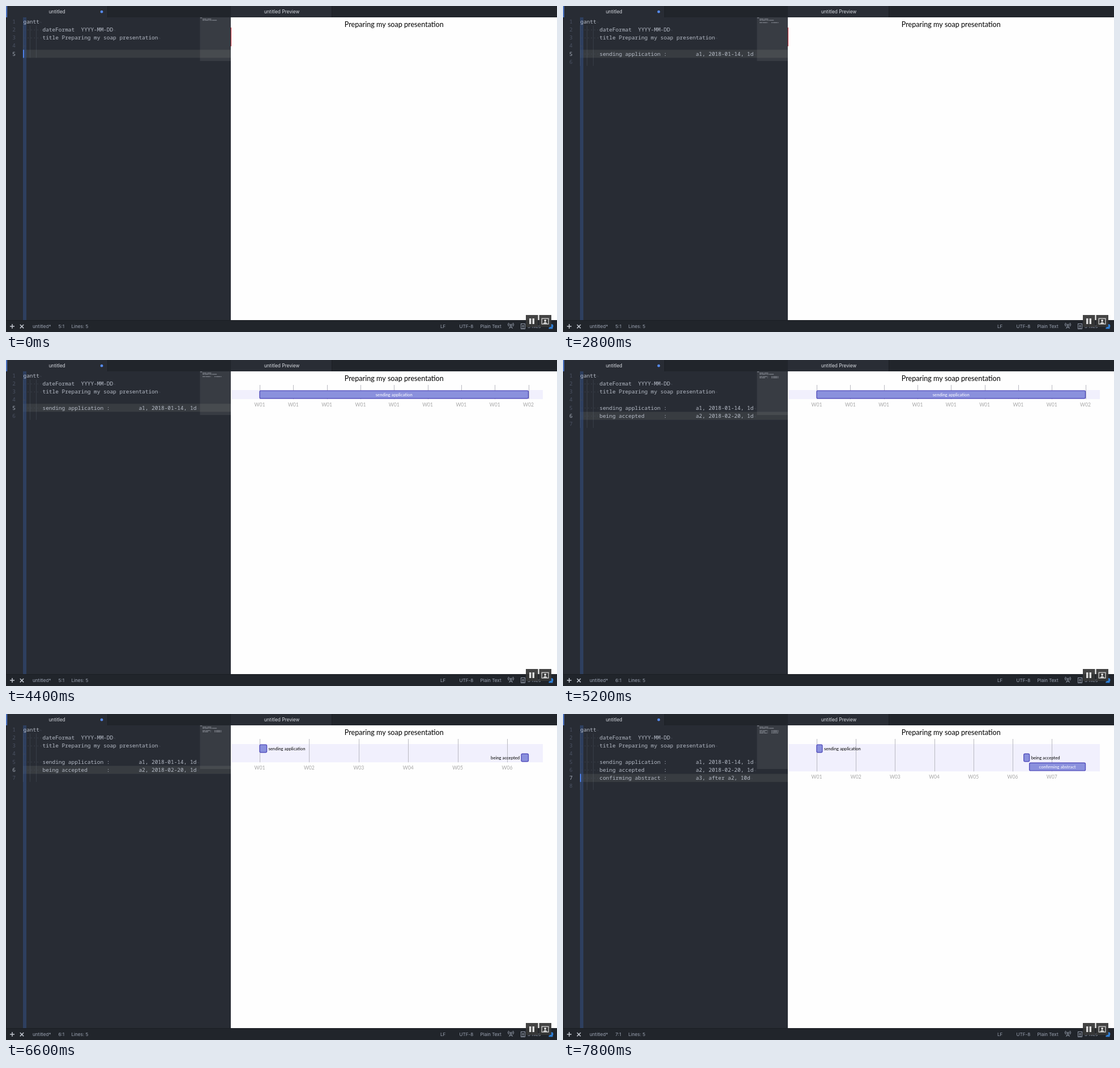
An HTML page with a canvas that plays this animation: 973 px wide and 575 px high, repeating every 8000 ms.

```html
<!DOCTYPE html>
<html lang="en">
<head>
<meta charset="utf-8">
<title>Gantt live preview</title>
<style>
html, body { margin: 0; width: 100%; height: 100%; overflow: hidden; background: #21252b; }
canvas { display: block; width: 973px; height: 575px; }
</style>
</head>
<body>
<canvas id="stage" width="973" height="575"></canvas>
<script>
const ctx = document.getElementById('stage').getContext('2d');
const LOOP = 8000;
const CHAR = 5.67, ROW = 14.2, LEFT = 30.5, TOP = 20.4;
const MONO = '9.45px "Noto Sans Mono", monospace';
const TAB = '8.3px Inter, sans-serif';
const STATUS = '8.1px Inter, sans-serif';
const chartFont = size => size + 'px Lato, sans-serif';

const LINES = [
  'gantt',
  '      dateFormat  YYYY-MM-DD',
  '      title Preparing my soap presentation',
  '',
  '      sending application :         a1, 2018-01-14, 1d',
  '      being accepted      :         a2, 2018-02-20, 1d',
  '      confirming abstract :         a3, after a2, 10d'
];
const PASTES = [2000, 4600, 6800];
const RENDERS = [3000, 5600, 7700];
const TASKS = [
  { name: 'sending application', start: 0, days: 1 },
  { name: 'being accepted', start: 37, days: 1 },
  { name: 'confirming abstract', start: 38, days: 10 }
];

const countPast = (times, t) => times.filter(x => t >= x).length;

function rect(x, y, w, h, color) {
  ctx.fillStyle = color;
  ctx.fillRect(x, y, w, h);
}

function text(s, x, y, font, color, align = 'left') {
  ctx.font = font;
  ctx.fillStyle = color;
  ctx.textAlign = align;
  ctx.fillText(s, x, y);
}

function stroke(color, width, ...paths) {
  ctx.strokeStyle = color;
  ctx.lineWidth = width;
  ctx.beginPath();
  for (const p of paths) {
    ctx.moveTo(p[0], p[1]);
    for (let i = 2; i < p.length; i += 2) ctx.lineTo(p[i], p[i + 1]);
  }
  ctx.stroke();
}

function disc(x, y, r, color) {
  ctx.fillStyle = color;
  ctx.beginPath();
  ctx.arc(x, y, r, 0, Math.PI * 2);
  ctx.fill();
}

function cursorOn(t) {
  if (t < 2000) return t < 200 || t % 800 >= 400;
  if (PASTES.some(p => t >= p && t < p + 200)) return true;
  const phase = t % 800;
  return phase < 200 || phase >= 600;
}

function drawTabs() {
  rect(0, 0, 973, 20, '#21252b');
  rect(0, 0, 179, 20, '#282c34');
  rect(397, 0, 178, 20, '#292d35');
  rect(179, 0, 1, 20, '#1b1e23');
  rect(575, 0, 1, 20, '#1b1e23');
  rect(0.5, 0, 1.5, 20, '#568af2');
  text('untitled', 90, 13, TAB, '#d7dae0', 'center');
  text('untitled Preview', 487, 13, TAB, '#d7dae0', 'center');
  disc(169, 10.2, 2.4, '#568af2');
}

function drawMinimap(lines) {
  rect(342.5, 20, 54.5, 77, 'rgba(255,255,255,0.075)');
  lines.forEach((line, i) => {
    for (const m of line.matchAll(/\S+/g))
      rect(342.8 + m.index * 0.7, 20.4 + i * 2.1, m[0].length * 0.7, 1.1, 'rgba(190,196,206,0.6)');
  });
}

function drawEditor(t) {
  const pasted = countPast(PASTES, t);
  const lines = LINES.slice(0, 4 + pasted);
  const current = Math.max(5, 4 + pasted);
  const rows = 5 + pasted;
  const rowY = n => TOP + (n - 1) * ROW;

  rect(0, 20, 397, 534, '#282c34');
  rect(30, rowY(current), 367, ROW, '#383c41');
  rect(30, 20, 6, 534, 'rgba(52,82,138,0.5)');
  for (const x of [30, 42, 53]) rect(x, rowY(2), 1, ROW * (rows - 1), 'rgba(150,160,180,0.15)');

  for (let n = 1; n <= rows; n++) {
    const base = rowY(n) + 10.4;
    text(String(n), 11.2, base, MONO, n === current ? '#abb2bf' : '#4b5263');
    if (n > lines.length) continue;
    const line = lines[n - 1];
    const indent = line.length - line.trimStart().length;
    text(line.trimStart(), LEFT + indent * CHAR, base, MONO, '#b7bdc8');
    for (let k = 0; k < indent; k++) rect(LEFT + (k + 0.4) * CHAR, base - 3.4, 1.1, 1.1, '#474d58');
    text('¬', LEFT + line.length * CHAR, base, '7px "Noto Sans Mono", monospace', '#454b56');
  }
  drawMinimap(lines);
  if (cursorOn(t)) rect(30, rowY(current), 1.7, ROW, '#528bff');
  rect(0, 20, 1, 534, '#1e2127');
  return current;
}

function drawBar(x, y, w) {
  ctx.beginPath();
  ctx.roundRect(x, y, w, 13.6, 2);
  ctx.fillStyle = '#8a90dd';
  ctx.fill();
  ctx.strokeStyle = '#534fbc';
  ctx.lineWidth = 1.4;
  ctx.stroke();
}

function drawChart(count) {
  const x0 = 448, width = 474.5, pitch = 16.1, bandTop = 53;
  const tasks = TASKS.slice(0, count);
  const last = tasks[count - 1];
  const total = last.start + last.days;
  const day = width / total;
  const bottom = bandTop + pitch * count;
  const step = count === 1 ? width / 8 : day * 7;

  rect(398, bandTop, 550, pitch * count, '#f1f0fd');
  for (let i = 0; i * step <= width + 0.01; i++) {
    const x = x0 + i * step;
    const week = count === 1 ? 1 + (i === 8) : i + 1;
    rect(Math.round(x), 44, 1, bottom - 44, '#b9b9c1');
    text('W0' + week, x, bottom + 12.6, chartFont(8.6), '#a6a6a6', 'center');
  }
  tasks.forEach((task, i) => {
    const x = x0 + task.start * day, w = task.days * day;
    const y = bandTop + 1.1 + i * pitch, base = y + 9.4;
    const font = chartFont(7.7);
    drawBar(x, y, w);
    ctx.font = font;
    const size = ctx.measureText(task.name).width;
    if (size < w) text(task.name, x + w / 2, base, font, '#fff', 'center');
    else if (x + w + size > x0 + width) text(task.name, x - 3, base, font, '#000', 'right');
    else text(task.name, x + w + 3, base, font, '#000');
  });
}

function drawPreview(t) {
  rect(397, 20, 576, 534, '#fefefe');
  const count = countPast(RENDERS, t);
  if (count) drawChart(count);
  else rect(397, 38, 1, 33, '#c8323c');
  text('Preparing my soap presentation', 685.3, 37.4, chartFont(12.6), '#000', 'center');
}

function drawTower(x, y, color) {
  stroke(color, 0.9, [x - 3, y + 5, x, y - 1, x + 3, y + 5], [x - 2, y + 3, x + 2, y + 3]);
  disc(x, y - 2, 1, color);
  for (const r of [2.8, 5]) {
    for (const a of [0, Math.PI]) {
      ctx.beginPath();
      ctx.arc(x, y - 2, r, a - 0.7, a + 0.7);
      ctx.stroke();
    }
  }
}

function drawStatus(current) {
  const gray = '#9da5b4';
  rect(0, 554, 973, 21, '#21252b');
  rect(0, 554, 973, 1, '#1b1e23');
  stroke('#c3c8d1', 1.5, [7, 565, 15, 565], [11, 561, 11, 569]);
  stroke('#c3c8d1', 1.5, [24.8, 562, 31.2, 568.4], [31.2, 562, 24.8, 568.4]);
  text('untitled*', 47, 568, STATUS, gray);
  text(current + ':1', 92.5, 568, STATUS, gray);
  text('Lines: 5', 115.5, 568, STATUS, gray);
  text('LF', 767, 568, STATUS, gray);
  text('UTF-8', 800.5, 568, STATUS, gray);
  text('Plain Text', 837.5, 568, STATUS, gray);
  drawTower(891.5, 564, gray);
  ctx.strokeRect(909.5, 560.5, 7, 9);
  stroke(gray, 0.9, [911, 564.5, 915, 564.5], [913, 562.5, 913, 566.5], [911, 568, 915, 568]);
  text('3 files', 921, 568, STATUS, gray);
  disc(963, 564.5, 3.4, '#2f7fd6');
  rect(958.5, 567, 7, 2.4, '#2f7fd6');
}

function drawControls() {
  const panel = 'rgba(54,54,54,0.93)', light = '#dedede';
  rect(918, 545, 21.5, 21, panel);
  rect(941.5, 545, 21.5, 21, panel);
  rect(924, 551, 3.4, 10, light);
  rect(929.6, 551, 3.4, 10, light);
  ctx.strokeStyle = light;
  ctx.lineWidth = 1.2;
  ctx.strokeRect(946.2, 551.2, 11.8, 9.8);
  disc(952.1, 555, 1.9, light);
  ctx.fillStyle = light;
  ctx.beginPath();
  ctx.moveTo(948, 560.5);
  ctx.quadraticCurveTo(952.1, 554.5, 956.2, 560.5);
  ctx.fill();
}

function draw(t) {
  const current = drawEditor(t);
  drawPreview(t);
  drawTabs();
  drawStatus(current);
  drawControls();
}

const began = performance.now();
function tick() {
  draw((performance.now() - began) % LOOP);
  requestAnimationFrame(tick);
}
tick();
</script>
</body>
</html>
```
